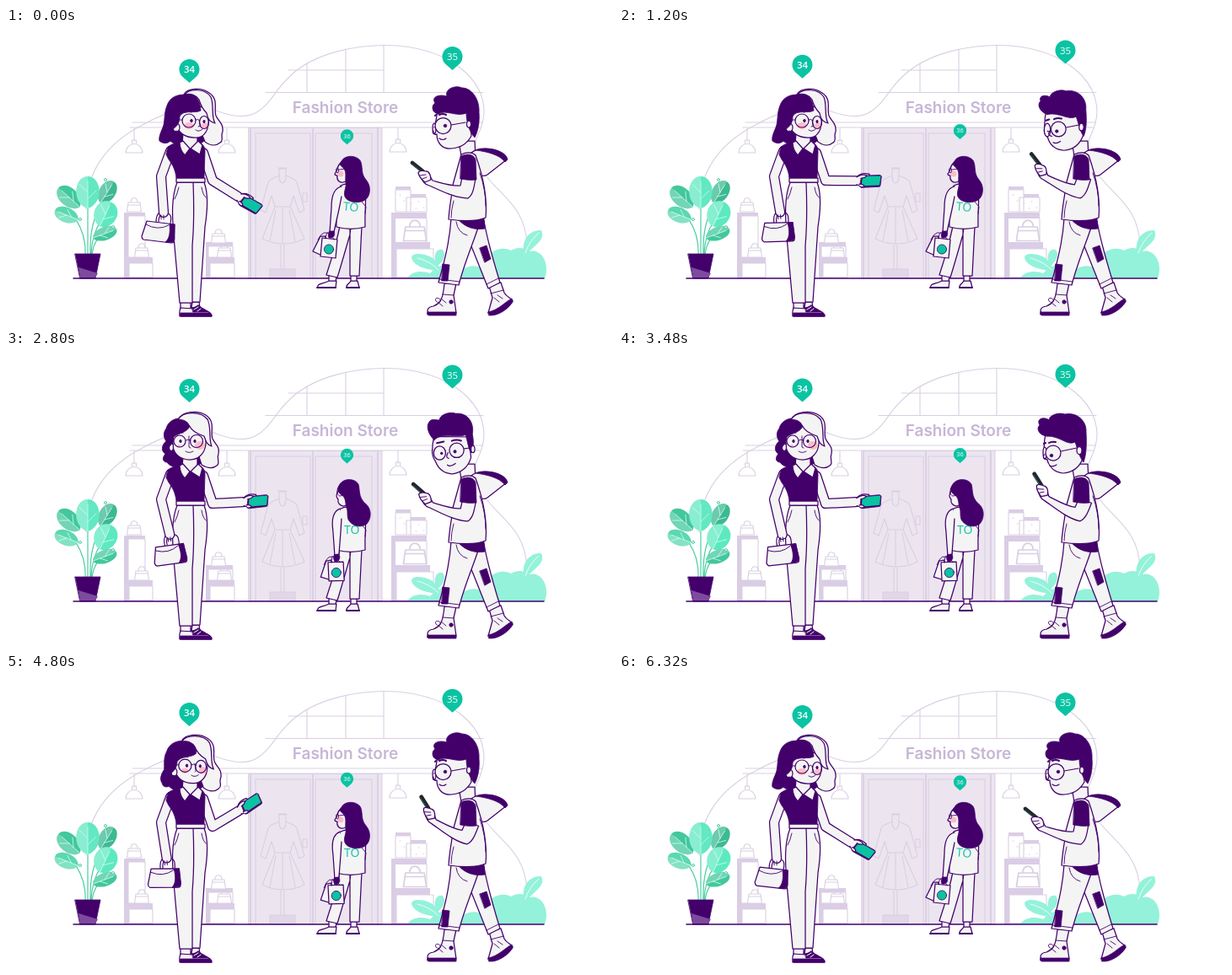
Animation, 720 px wide and 350 px high, one loop 6360 ms. Source, as an HTML page:

```html
<!DOCTYPE html>
<html lang="en">
<head>
<meta charset="utf-8">
<title>Fashion store</title>
<style>
html, body { margin: 0; width: 100%; height: 100%; overflow: hidden; background: #fff }
svg { display: block; width: 720px; height: 350px }
path, line, rect, circle, polygon { stroke-linecap: round; stroke-linejoin: round }
.o { fill: #f4f4f4; stroke: #43006b; stroke-width: 1.25 }
.p { fill: #43006b; stroke: #43006b; stroke-width: .8 }
.l { fill: none; stroke: #43006b; stroke-width: 1.2 }
.brow { fill: none; stroke: #43006b; stroke-width: 2 }
.thin { fill: none; stroke: #43006b; stroke-width: .9 }
.b { fill: none; stroke: #d9cfe2; stroke-width: 1.1 }
.bw { fill: #fff; stroke: #d9cfe2; stroke-width: 1.1 }
.bf { fill: #dacde5 }
.blush { fill: #ffa9b8; opacity: .75 }
.teal { fill: #0ac3a2 }
.limb { fill: none }
.limb path:first-child { stroke: #43006b; stroke-width: 12.200 }
.limb path:last-child { stroke: #f4f4f4; stroke-width: 9.700 }
.pin text { fill: #fff; text-anchor: middle; font-family: "Open Sans", "Noto Sans", sans-serif }
</style>
</head>
<body>
<svg viewBox="0 0 720 350">
<defs>
  <g id="lamp"><path class="b" d="M0 119V134M-2.500 137V133H2.500V137"/><path class="bw" d="M-10 148C-9 134 9 134 10 148Z"/></g>
  <g id="purse"><path class="b" d="M-4 0C-4 -7 4 -7 4 0"/><path class="bw" d="M-7 0H7L8.500 11H-8.500Z"/><path class="b" d="M-7 3H7"/></g>
</defs>

<!-- store -->
<path class="b" d="M95 215C95 168 122 136 160 116C192 98 225 88 252 99C306 119 312 80 334 60C364 28 422 18 465 21C530 27 567 62 567 100C566 126 551 132 557 150C570 196 616 200 618 258"/>
<path class="b" d="M308 76.500H566M150 112H565M147 118H562M335 50H448M357 42V76M403 25V76M448 20V76"/>
<text x="402.500" y="100.500" text-anchor="middle" font-family="Inter, sans-serif" font-size="19" font-weight="600" fill="#c7b6d7">Fashion Store</text>
<rect x="288" y="118.500" width="158" height="178" fill="#ece5f0" stroke="#d9cfe2"/>
<path class="b" d="M296 297V125H361V297M367 297V125H434V297"/>
<path d="M290 120V297M364 120V297M441 120V297" stroke="#dbcfe5" stroke-width="2"/>
<rect class="b" x="352" y="196" width="5" height="10"/>
<!-- dress form -->
<g class="b">
  <path d="M324 175V167H332V175M323 166H333M324 175C318 178 313 179 311 183L302 216L308 219L315 199L319 212L304 250C319 258 339 258 354 250L337 212L341 199L348 219L354 216L345 183C343 179 338 178 332 175C332 187 324 187 324 175M319 212H337M328 213V255M320 216L313 253M336 216L343 253"/>
  <path d="M326 257V286M330 257V286"/><path fill="#e1d7e9" d="M313 286H343V297H313Z"/>
</g>
<use href="#lamp" x="152"/><use href="#lamp" x="262"/><use href="#lamp" x="465" y="-1"/>
<!-- shelves -->
<g class="bf">
  <path d="M140 219H165V297H140ZM144 272H174V297H144ZM237 254H269V297H237ZM240 272H271V297H240Z"/>
  <path d="M457 219H499V226H457ZM457 226H462V254H457ZM457 254H503V297H457ZM462 188H480V192H462ZM475 197H498V201H475Z"/>
</g>
<path class="bw" d="M145 223H165V272H145ZM146 279H174V296H146ZM242 279H271V296H242ZM240 259H269V272H240ZM463 262H507V296H463ZM462 192H480V218H462ZM475 201H499V218H475Z"/>
<path class="b" d="M480 208h1m8 -2h1m-4 8h1m8 -1h1M467 198h1m4 7h1M499 226V254"/>
<use href="#purse" x="152" y="207"/><use href="#purse" x="161" y="261"/>
<use href="#purse" x="252" y="244"/><use href="#purse" x="259" y="261"/>
<use href="#purse" transform="translate(485 236) scale(1.600 1.500)"/>
<!-- bush -->
<g fill="#94f2da">
  <path d="M476 297C482 287 496 288 503 291C514 278 533 277 541 287C552 280 560 282 565 286C568 267 585 257 599 264C608 258 617 262 621 265C634 261 646 278 639 297Z"/>
  <path d="M516 288C500 288 482 282 481 272C482 265 502 268 508 275C511 279 514 284 516 288Z"/>
  <path d="M614 268C611 250 622 239 635 240C640 252 628 256 619 267Z"/>
  <path d="M510 284C506 268 511 261 518 263C523 270 518 278 510 284Z"/>
</g>
<path d="M488 273Q504 277 513 287M632 243Q621 252 616 267" fill="none" stroke="#fff" stroke-width=".8"/>
<!-- plant -->
<g fill="none" stroke="#4bcfa3" stroke-width="1.200"><path d="M97 268V198M94 268Q95 240 77 220M100 268Q99 224 117 208M101 268Q102 240 118 222M102 268Q104 252 115 245"/></g>
<g id="leaves"></g>
<g fill="#fff" stroke="#4bcfa3"><circle cx="118" cy="180" r="1.500"/><circle cx="127" cy="236" r="1.500"/><circle cx="88" cy="227" r="1.500"/></g>
<path class="p" d="M82 268H112L106 297H88Z"/><path fill="#7d4b9e" d="M86 284L109 291L106 296H88Z"/>
<path d="M80 297H638" stroke="#43006b" stroke-width="1.500"/>

<!-- shopper -->
<g>
  <path class="o" d="M383 293H392L391 302H383ZM409 293H416V302H409Z"/>
  <path class="o" d="M392 300L391 308H370C368 303 376 304 383 300ZM409 300H417L419 308H404C403 304 407 304 409 300Z"/>
  <path class="brow" d="M369 308H391M404 308H419"/>
  <path class="o" d="M396 235H409L408 245C403 262 398 280 393 296L380 293C387 272 392 254 396 235ZM408 235H422L419 294H408Z"/>
  <path class="o" d="M397 187C405 183 416 185 424 191C429 204 425 211 426 236C415 239 403 239 392 236L391 200Z"/>
  <path class="thin" d="M421 205L427 212L426 220"/>
  <text id="shirt" y="217" font-family="Open Sans, sans-serif" font-size="14" font-weight="500" fill="#0ac3a2">TO</text>
  <g id="carry">
    <path class="o" d="M373 247L379 247L377 271L364 265Z"/>
    <path class="thin" d="M370 251Q377 237 385 246"/>
    <path class="o" d="M375 249L393 251L391 273L373 271Z"/>
    <circle class="teal" cx="383" cy="262.500" r="5.600" stroke="#43006b" stroke-width=".8"/>
    <path class="thin" d="M379 250Q381 234 389 251"/>
    <path class="o" d="M398 188C388 190 386 202 386 213L384 242L389 242L395 215L398 200"/>
    <path class="p" d="M384 241H389C391 246 388 250 383 249Q381 245 384 241Z"/>
  </g>
  <g id="shopHead"></g>
</g>

<!-- woman -->
<g>
  <g id="ladyBack"></g>
  <path class="o" d="M207 325H219V333H207ZM221 325H229L230 332H220Z"/>
  <path class="o" d="M207 332C205 338 206 341 207 342H244C245 338 237 335 232 332L228 329L222 333Z"/>
  <path class="p" d="M207 338H242L244 342H206ZM221 332L228 330L240 337H222Z"/>
  <path d="M223 334L228 331M227 336L231 333" stroke="#fff"/>
  <path class="o" d="M218 183H235C240 196 239 217 236 236L230 325H217L219 260Z"/>
  <path class="o" d="M203 183H222C223 208 223 235 221 258L221 326H206L199 248C197 222 196 201 203 183Z"/>
  <path class="thin" d="M205 189Q203 198 200 203M232 189Q233 197 237 201"/>
  <g class="limb" id="upperRight"><path/><path/></g>
  <g id="phone">
    <path class="o" d="M37 -4.500C42 -10 48 -9 52 -8L53 6C46 8 41 7 37 4.500"/>
    <path class="p" d="M43 -6L64 -7C66 -7 67 -5 66 -3L65 5C65 7 63 7 61 7L43 8C41 8 41 6 41 4Z"/>
    <path class="teal" d="M44 -5.500L65.500 -6L64 5L42.500 6Z"/>
    <path class="o" d="M38 -5Q44 -9 49 -6Q46 -3 42 -3M40 4Q44 3 46 6Q45 8 41 7"/>
  </g>
  <g id="bag">
    <path class="l" d="M178 231C178 218 184 216 190 219C197 221 196 226 195 232M181 230C181 222 185 219 190 221"/>
    <path class="o" d="M167 229L200 233L199 253C199 255 197 255 196 255L163 251C161 250 161 249 161 247Z"/>
    <path class="p" d="M194 233L200 233L200 250C200 254 196 255 189 254C194 250 195 242 194 233Z"/>
    <path class="thin" d="M166 233Q180 241 193 234"/>
  </g>
  <g class="limb" id="upperLeft"><path/><path/></g>
  <path id="fingers" class="thin" d="M184 227V222M187 227V222"/>
  <path class="p" d="M192 141C197 137 203 136 208 136H229C234 138 236 141 236 146L235 178H202C201 168 197 161 193 156L190 150Z"/>
  <path class="o" d="M210 125H227V137L219 144L209 137Z"/>
  <path class="o" d="M206 136L210 134L218 143L212 151Q206 144 206 136ZM228 134L233 139L230 150L219 143Z"/>
  <path class="o" d="M202 178H236V183H202Z"/>
  <g id="ladyHead"></g>
</g>

<!-- man -->
<g>
  <path class="o" d="M573 306L587 302L591 314C594 320 600 320 601 324C596 330 589 336 577 340L572 338L577 320Z"/>
  <path class="p" d="M572 337C584 335 593 324 600 321L601 325C596 333 584 342 573 341Z"/>
  <path class="thin" d="M579 320L585 325M583 317L589 321M575 315L590 311"/>
  <path class="o" d="M520 303H534L531 317L534 338H501C499 335 500 331 507 330C514 327 518 325 520 303Z"/>
  <path class="p" d="M500 337H534V341H503C499 341 499 339 500 337Z"/>
  <path class="thin" d="M512 325L518 330M516 321L522 326M518 316L531 317M511 325C505 319 517 319 515 324"/>
  <circle class="p" cx="528" cy="325" r="2.200"/>
  <path class="o" d="M545 235L567 229C571 252 578 276 586 302L572 309L550 254Z"/>
  <path class="o" d="M528 226L561 234C553 258 543 281 537 305L513 302C519 280 526 256 528 226Z"/>
  <path class="thin" d="M514 298L538 301M570 304L584 297M534 230Q536 243 547 246"/>
  <path class="p" d="M518 280L526 281L524 300H517ZM562 261L570 258L575 274L568 278Z"/>
  <path class="p" d="M535 226H567L568 238C556 240 545 237 535 226Z"/>
  <path class="o" d="M537 134H556L557 154L540 152Z"/>
  <path class="o" d="M552 148C560 141 576 142 588 148C592 150 595 154 594 156L571 174C566 177 562 175 560 170Z"/>
  <path class="p" d="M558 145C572 140 591 145 595 156L592 159C585 150 571 147 558 145Z"/>
  <path class="o" d="M540 150C546 147 553 147 557 151C566 176 571 203 569 225C557 230 540 229 525 227C526 210 529 199 530 186Z"/>
  <path class="thin" d="M531 205Q528 216 528 225M562 172Q569 192 569 211"/>
  <g id="readArm">
    <path class="o" d="M541 177L557 178C555 190 554 198 548 202C533 202 516 193 502 187C496 186 493 180 491 174L498 176C501 171 504 178 506 181C517 184 529 188 539 187Z"/>
    <g id="readPhone"><path d="M482 160L494.500 170" stroke="#26242e" stroke-width="4.800"/><path d="M482 162L492 170" stroke="#17876f" stroke-width=".8"/></g>
    <path class="o" d="M489 172C489 169 495 169 498 170C502 170 504 175 504 180L497 183C493 180 490 176 489 172Z"/>
    <path class="thin" d="M491 175L498 174M494 179L499 177"/>
  </g>
  <path class="p" d="M540 152C546 149 554 149 557 156L558 180C551 181 545 180 539 179Z"/>
  <g id="manHead"></g>
</g>
<g id="pins"></g>
</svg>

<script>
const LOOP = 6360, BOB = LOOP / 3;
const $ = id => document.getElementById(id);
const add = (parent, tag, attrs) => {
  const el = document.createElementNS('http://www.w3.org/2000/svg', tag);
  for (const k in attrs) el.setAttribute(k, attrs[k]);
  return $(parent).appendChild(el);
};

// Key lists alternate time and value, with eased moves between them.
const keys = {
  man: [0, 0, 560, 1, 950, 1, 1700, 2, 2600, 2, 3250, 1, 3500, 1, 3860, 0, LOOP, 0],
  read: [0, 0, 600, 1, 950, 1, 1650, 0, 2650, 0, 3300, 1, 5100, 1, 5780, 0, LOOP, 0],
  lady: [0, 0, 1800, 0, 2700, 1, 3700, 1, 5700, 0, LOOP, 0],
  arm: [0, 32, 700, 32, 1700, -31, 2000, -31, 2750, -3, 3550, -3, 4500, -31, 4950, -31, 6150, 32, LOOP, 32],
  shop: [0, 0, 1500, 0, 2600, 1, 3700, 1, 4700, 0, LOOP, 0],
  carry: [0, 0, 1200, 0, 2600, 1, 4850, 1, 6300, 0, LOOP, 0]
};
function at(list, t) {
  let i = 0;
  while (list[i + 2] < t) i += 2;
  const [t0, a, t1, b] = list.slice(i, i + 4);
  return a + (b - a) * (1 - Math.cos(Math.PI * (t - t0) / (t1 - t0))) / 2;
}

// A morph is one path with a pose for each whole value of its track.
const morphs = [];
function morph(parent, track, cls, ...poses) {
  const values = poses.map(d => d.match(/-?[\d.]+/g).map(Number));
  morphs.push({ el: add(parent, 'path', { class: cls }), track, values, shape: poses[0] });
}
function mix({ values, shape }, v) {
  const i = Math.min(Math.floor(v), values.length - 2), k = v - i;
  let n = 0;
  return shape.replace(/-?[\d.]+/g, () => {
    const a = values[i][n], b = values[i + 1][n++];
    return +(a + (b - a) * k).toFixed(2);
  });
}
const ring = (x, y, rx, ry = rx) => `M${x - rx} ${y}a${rx} ${ry} 0 1 0 ${2 * rx} 0a${rx} ${ry} 0 1 0 ${-2 * rx} 0`;

// Leaves: x, y, rx, ry, tilt, colour
for (const [x, y, rx, ry, r, c] of [
  [75, 201, 11, 17, -48, '#43c79c'], [120, 195, 10, 15, 32, '#3db991'], [72, 222, 9, 15, -68, '#5bd8b0'],
  [97, 195, 14, 19, 0, '#62e8c2'], [118, 221, 14, 16, 25, '#5de9c0'], [117, 244, 8, 15, 70, '#43c79c']]) {
  const g = { transform: `translate(${x} ${y}) rotate(${r})` };
  const half = s => `M0 ${ry}C${s * rx * 1.4} ${ry * .7} ${s * rx * 1.2} ${-ry} 0 ${-ry}Z`;
  add('leaves', 'path', { ...g, fill: c, d: half(-1) + half(1) });
  add('leaves', 'path', { ...g, fill: '#fff', opacity: .25, d: half(-1) });
  add('leaves', 'path', { ...g, fill: 'none', stroke: '#d5fff2', 'stroke-width': .7, d: `M0 ${ry}V${-ry * .7}M0 ${ry * .4}L${rx * .7} ${-ry * .1}M0 0L${-rx * .7} ${-ry * .5}` });
}

// Shopper's head
morph('shopHead', 'shop', 'o',
  'M404 158C398 157 393 163 393 168L390 173C390 175 392 175 393 175C392 180 395 184 400 183L409 180Z',
  'M403 158C396 157 393 162 393 167L392 172C392 174 393 175 394 176C393 180 396 184 401 184L409 180Z');
morph('shopHead', 'shop', 'blush', ring(397, 173, 3.5), ring(395, 173, 1));
morph('shopHead', 'shop', 'thin', ring(393, 169, 1.5, 3), ring(397, 168, 4, 4));
morph('shopHead', 'shop', 'thin', 'M395 168L403 167', 'M400 168L405 167');
morph('shopHead', 'shop', 'p',
  'M398 158C401 151 414 150 420 157C424 164 420 172 427 180C434 188 432 200 426 204C418 209 405 207 402 200C400 194 404 190 403 184C402 176 405 170 399 165C395 162 396 160 398 158Z',
  'M395 160C398 151 413 150 418 158C420 166 418 172 425 180C434 186 434 198 428 205C420 211 410 207 406 200C404 194 406 190 404 186C402 180 404 174 397 170C393 167 393 163 395 160Z');

// Woman's hair and face
morph('ladyBack', 'lady', 'p',
  'M215 80C205 77 194 82 191 92C187 101 189 111 186 118C183 125 181 130 182 134C187 138 192 137 195 134C199 138 204 138 208 137L231 137C236 134 240 130 239 124Z',
  'M213 81C203 77 192 83 190 92C186 97 187 103 190 107C184 112 184 119 189 122C184 128 187 132 191 132C194 137 202 139 209 137L227 137C231 134 235 130 234 124Z');
morph('ladyBack', 'lady', 'o',
  'M211 79C215 71 232 70 241 77C253 85 246 96 249 104C252 111 258 113 257 123C254 128 259 133 254 136C248 141 241 139 236 135L226 110Z',
  'M204 82C208 71 228 70 237 76C249 84 242 96 245 104C248 111 254 113 252 122C249 128 255 133 250 136C244 141 237 138 232 135L224 110Z');
morph('ladyHead', 'lady', 'o',
  'M203 103C203 94 212 89 224 91C237 93 242 103 240 114C239 124 233 131 224 130C212 130 204 124 203 115Z',
  'M198 101C198 93 207 88 218 89C232 90 238 100 237 110C236 122 228 129 218 129C207 129 199 122 198 113Z');
morph('ladyHead', 'lady', 'o', ring(202, 118, 4, 5), ring(196, 114, 2.5, 4.5));
morph('ladyHead', 'lady', 'thin', ring(202, 125, 3), ring(195, 120, 2));
morph('ladyHead', 'lady', 'blush', ring(217, 116, 6, 4), ring(205, 113, 2, 2));
morph('ladyHead', 'lady', 'blush', ring(236, 116, 4, 3.5), ring(230, 112, 6, 5));
morph('ladyHead', 'lady', 'p',
  'M199 119C191 105 192 83 211 79C223 76 230 83 231 98C223 102 211 96 206 105C206 111 204 116 199 119Z',
  'M194 113C187 101 192 83 207 80C214 78 219 83 218 89C215 97 205 97 199 102C198 107 197 111 194 113Z');
morph('ladyHead', 'lady', 'o',
  'M212 79C218 71 237 72 243 82C247 91 243 105 248 113C242 112 239 107 238 101C234 97 231 92 229 85C226 80 219 77 212 79Z',
  'M204 82C209 71 231 71 239 81C244 91 240 105 244 113C238 111 237 107 235 101C228 99 221 96 217 88C214 83 209 81 204 82Z');
morph('ladyHead', 'lady', 'l', ring(217, 110, 8), ring(206, 107, 7));
morph('ladyHead', 'lady', 'l', ring(235, 112, 5.5, 7.5), ring(226, 107, 7.5));
morph('ladyHead', 'lady', 'p', ring(220, 110, 1.3, 1.8), ring(207, 107, 1.2, 1.7));
morph('ladyHead', 'lady', 'p', ring(235, 111, 1.1, 1.8), ring(224, 107, 1.2, 1.7));
morph('ladyHead', 'lady', 'thin',
  'M225 109Q228 107 230 110M229 110L231 116L228 117M209 109L203 109M213 100Q217 98 220 100M225 121Q229 124 233 120',
  'M213 106Q216 104 219 106M217 101L217 114L219 115M199 106L197 107M203 97Q206 95 210 97M213 119Q217 122 222 119');

// Man's head: side view, looking down, facing out
morph('manHead', 'man', 'o',
  'M512 98C510 108 510 114 507 121C505 125 508 127 511 126C511 136 517 143 526 143C536 143 546 139 552 128L549 99Z',
  'M506 99C503 110 505 116 504 122C503 126 506 128 508 129C510 138 517 144 527 145C538 144 546 138 550 128L547 102Z',
  'M508 102C507 108 506 112 506 118C506 124 508 128 510 132C514 141 521 146 530 146C540 145 549 138 552 126L550 102Z');
morph('manHead', 'man', 'p',
  'M513 102C505 101 504 92 509 89C504 82 513 78 523 81C520 73 532 67 541 71C552 71 562 84 561 100C562 112 560 122 556 130C550 124 546 112 546 101C534 106 522 96 513 102Z',
  'M508 101C499 101 494 92 499 88C494 79 506 78 510 82C510 77 520 72 529 75C543 72 555 83 554 96C555 112 554 124 551 132C546 126 544 116 541 108C532 113 524 101 508 101Z',
  'M508 107C501 98 499 88 503 83C507 80 511 83 515 82C516 75 528 71 535 74C548 73 556 85 553 99C555 107 555 112 552 118C549 114 549 105 546 97C536 101 516 94 508 107Z');
morph('manHead', 'man', 'o', ring(549, 114, 2.5, 4), ring(546, 118, 3, 4.5), ring(556, 116, 2, 4));
morph('manHead', 'man', 'o', ring(508, 119, 2, 6), ring(505, 121, 2, 7), ring(517, 121, 8.5));
morph('manHead', 'man', 'o', ring(518.5, 116, 9.5), ring(515, 121, 9), ring(540, 117, 8.5));
morph('manHead', 'man', 'p', ring(521, 116, 1.8), ring(513, 124, 1.8), ring(538, 118, 1.5));
morph('manHead', 'man', 'p', ring(508, 118, .2), ring(505, 123, .2), ring(520, 121, 1.5));
morph('manHead', 'man', 'l',
  'M528 115L545 112M514 131Q518 134 522 131',
  'M524 119L543 115M511 136Q514 138 519 135',
  'M549 115L553 115M527 135Q531 138 537 133');
morph('manHead', 'man', 'brow', 'M514 103Q518 101 522 103', 'M510 109Q513 107 518 108', 'M534 106Q540 104 546 106');
morph('manHead', 'man', 'brow', 'M509 104L510 103', 'M504 110L506 109', 'M513 109L523 107');
morph('manHead', 'man', 'l', 'M507 122Q506 126 510 126', 'M504 123Q502 128 508 129', 'M530 120Q526 126 530 127');

// Pins: label, x, lowest centre y, size, lift, weight
const pins = [['34', 217.5, 49, 1, 5.6, 600], ['35', 529.5, 34, 1, 7.8, 400], ['36', 404.5, 128, .64, 6.5, 400]].map(([label, x, y, s, lift, w]) => {
  const g = add('pins', 'g', { class: 'pin' });
  g.innerHTML = `<path class="teal" d="M0 16L-8.500 8.500A12 12 0 1 1 8.500 8.500Z"/><text y="4.200" font-size="11.500" font-weight="${w}">${label}</text>`;
  return { g, x, y, s, lift };
});

const place = (id, transform) => $(id).setAttribute('transform', transform);
const turn = (id, ...args) => place(id, `rotate(${args.join(' ')})`);
function limb(id, shoulder, [x, y], angle, length) {
  const a = angle * Math.PI / 180;
  const d = `M${shoulder}L${x} ${y}L${x + length * Math.cos(a)} ${y + length * Math.sin(a)}`;
  for (const path of $(id).children) path.setAttribute('d', d);
}
function draw(t) {
  const v = {};
  for (const k in keys) v[k] = at(keys[k], t);
  for (const m of morphs) m.el.setAttribute('d', mix(m, v[m.track]));

  const bob = (1 - Math.cos(2 * Math.PI * t / BOB)) / 2;
  for (const { g, x, y, s, lift } of pins) g.setAttribute('transform', `translate(${x} ${y - lift * bob}) scale(${s})`);

  const swing = t < LOOP / 2 ? Math.sin(Math.PI * t / LOOP) : 2 - 2 * t / LOOP;
  const sway = `rotate(${-10 * swing} 184 176)`;
  limb('upperLeft', [195, 146], [184, 176], 86 - 10 * swing, 43);
  place('fingers', sway);
  place('bag', `${sway} rotate(${-5 * swing} 189 220)`);
  limb('upperRight', [234, 148], [245, 181], v.arm, 36);
  place('phone', `translate(245 181) rotate(${v.arm})`);

  turn('readArm', 12 * v.read, 548, 196);
  turn('readPhone', 7 * v.read, 495, 171);
  turn('carry', -8 * v.carry, 391, 200);
  $('shirt').setAttribute('x', 400 + v.carry);
  turn('shirt', 5 - 5 * v.carry, 408, 211);
}
function frame(now) {
  draw(now % LOOP);
  requestAnimationFrame(frame);
}
draw(0);
requestAnimationFrame(frame);
</script>
</body>
</html>
```
